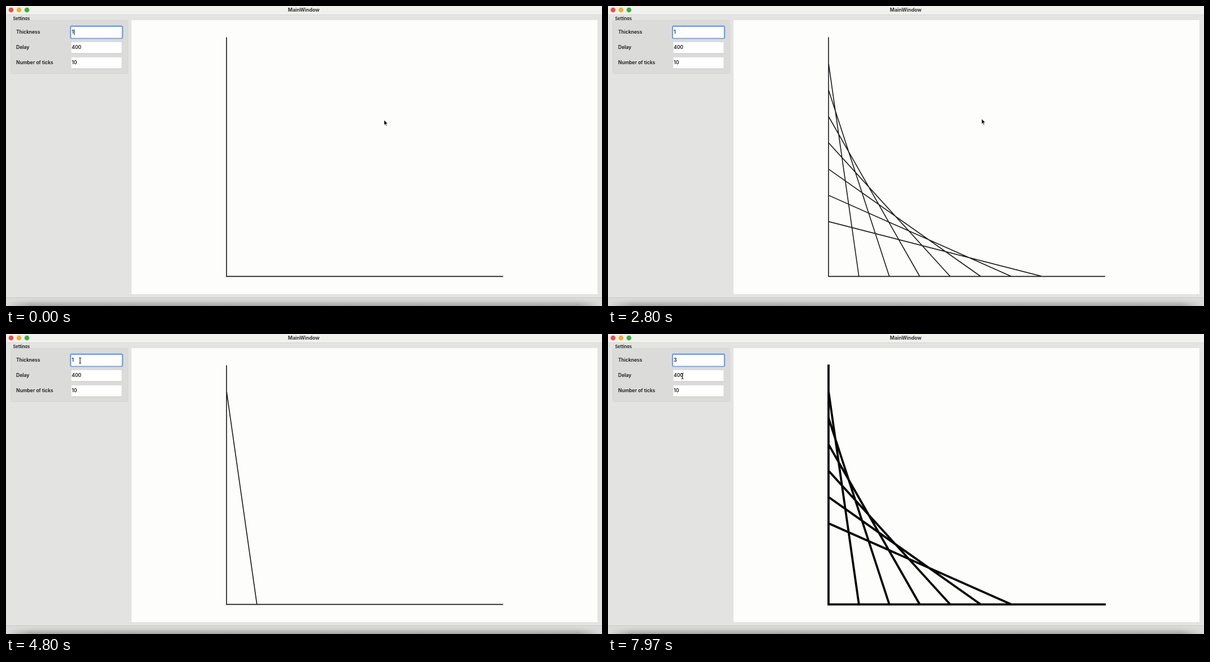
Write an HTML page that moves like this. It is 1054x531 px and loops after 8000 ms.

```html
<!DOCTYPE html>
<html lang="en">
<head>
<meta charset="utf-8">
<title>MainWindow</title>
<style>
  html, body { margin: 0; width: 100%; height: 100%; overflow: hidden; background: #e3e3e2; }
  svg { display: block; width: 1054px; height: 531px; }
  text { font: 600 8.5px Inter, "Open Sans", sans-serif; fill: #161616; }
  .title { font-size: 8.8px; font-weight: 700; fill: #333; }
  .group { font-size: 7.4px; }
  #chart { stroke-linecap: square; fill: none; }
</style>
</head>
<body>
<svg viewBox="0 0 1054 531">
  <defs>
    <linearGradient id="bar" x2="0" y2="1">
      <stop offset="0" stop-color="#dededd"/>
      <stop offset=".4" stop-color="#cfcfce"/>
      <stop offset="1" stop-color="#a3a3a2"/>
    </linearGradient>
    <linearGradient id="barEnds">
      <stop offset="0" stop-color="#dcdcdb"/>
      <stop offset=".04" stop-color="#dcdcdb" stop-opacity="0"/>
      <stop offset=".96" stop-color="#dcdcdb" stop-opacity="0"/>
      <stop offset="1" stop-color="#dcdcdb"/>
    </linearGradient>
  </defs>

  <rect width="1054" height="531" fill="#e3e3e2"/>
  <rect width="1054" height="15" fill="#f0f0ed"/>
  <rect y="15" width="1054" height="1" fill="#d6d6d5"/>
  <circle cx="9" cy="7" r="4.3" fill="#eb4f42"/>
  <circle cx="23" cy="7" r="4.3" fill="#efae2e"/>
  <circle cx="37" cy="7" r="4.3" fill="#3bb03b"/>
  <text class="title" x="526.5" y="10" text-anchor="middle">MainWindow</text>

  <text class="group" x="12.5" y="24.6">Settings</text>
  <rect x="8.5" y="25.5" width="207" height="94" rx="2" fill="#dbdbda" stroke="#d4d4d3"/>
  <g id="form"></g>
  <rect id="caret" y="41.5" width="1" height="10" fill="#111"/>

  <rect x="222" y="25" width="824" height="485" fill="#fdfdfc"/>
  <path id="chart"/>

  <rect y="516" width="1054" height="1" fill="#c6c6c5"/>
  <rect y="517" width="1054" height="14" fill="url(#bar)"/>
  <rect y="517" width="1054" height="14" fill="url(#barEnds)"/>

  <path id="arrow" d="M0 0V9.6L2.2 7.6L3.7 11L5.3 10.3L3.8 7H6.8Z" fill="#0c0c0c" stroke="#fff" stroke-width=".8"/>
  <path id="beam" d="M-2-5Q0-5 0-3.8Q0-5 2-5M0-4V4M-2 5Q0 5 0 3.8Q0 5 2 5" fill="none" stroke="#1a1a1a" stroke-width="1.1"/>
</svg>
<script>
const LOOP = 8000, DELAY = 400, FIRST_TICK = 310;
const TICKS = 9, CYCLE = 11;
const RESTART = FIRST_TICK + 14 * DELAY;
const CLEARED = 5150, TYPED = 5400;
const $ = id => document.getElementById(id);

// Pointer keys: time, x, y
const sweep = [
  [2700, 668.5, 201.5], [2800, 661, 199.5], [3050, 590, 180], [3350, 420, 135],
  [3650, 255, 94], [3900, 165, 70], [4130, 129.5, 62.5], [4400, 131, 47]
];
const drop = [[7450, 132, 47], [7600, 132, 54], [7800, 131.5, 70], [7900, 131.5, 74.5]];

const fields = [["Thickness", "", 37], ["Delay", "400", 64], ["Number of ticks", "10", 91]];
$("form").innerHTML = fields.map(([label, value, y], i) => `
  <text x="18" y="${y + 12.3}">${label}</text>
  ${i ? `<rect x="115.5" y="${y}" width="89" height="20.5" fill="#c3c3c2"/>`
      : `<rect x="114.3" y="35.8" width="91.6" height="21.2" rx="1.5" fill="#fff" stroke="#70a0e6" stroke-width="2.6"/>`}
  <rect x="115.5" y="${y}" width="89" height="19.5" fill="#fff"/>
  <text x="116.3" y="${y + 12.3}">${value}</text>`).join("");
const thickness = $("form").querySelectorAll("text")[1];

function along(keys, t) {
  if (t <= keys[0][0]) return keys[0].slice(1);
  for (let i = 1; i < keys.length; i++) {
    const [t0, x0, y0] = keys[i - 1], [t1, x1, y1] = keys[i];
    if (t < t1) {
      const k = (t - t0) / (t1 - t0);
      return [x0 + (x1 - x0) * k, y0 + (y1 - y0) * k];
    }
  }
  return keys[keys.length - 1].slice(1);
}

function lineCount(t) {
  const start = t < RESTART ? FIRST_TICK : RESTART;
  const n = Math.floor((t - start) / DELAY) + 1;
  const step = (n + CYCLE) % CYCLE;
  return step > TICKS ? 0 : step;
}

function chartPath(count) {
  let d = "M390 56V478.6H878.4";
  for (let k = 1; k <= count; k++) {
    d += `M390.3 ${56.8 + 46.4 * k}L${390 + 53.65 * k} 478`;
  }
  return d;
}

function place(node, [x, y], shown) {
  node.setAttribute("transform", `translate(${x} ${y})`);
  node.style.display = shown ? "" : "none";
}

function draw(t) {
  const thick = t >= RESTART;
  $("chart").setAttribute("d", chartPath(lineCount(t)));
  $("chart").setAttribute("stroke", thick ? "#050505" : "#1a1a1a");
  $("chart").setAttribute("stroke-width", thick ? 3.8 : 1.6);

  const value = t < CLEARED ? "1" : t < TYPED ? "" : "3";
  thickness.textContent = value;
  const blink = t < CLEARED ? t + 150 : t < TYPED ? t - CLEARED : t - TYPED;
  $("caret").setAttribute("x", { "1": 120.5, "": 116.5, "3": 122 }[value]);
  $("caret").style.display = blink % 1000 < 500 ? "" : "none";

  const late = t >= drop[0][0];
  const pos = along(late ? drop : sweep, t);
  const overField = late || t > 4230;
  const hidden = t >= CLEARED && !late;
  place($("arrow"), pos, !overField);
  place($("beam"), pos, overField && !hidden);
}

function frame() {
  draw(performance.now() % LOOP);
  requestAnimationFrame(frame);
}
frame();
</script>
</body>
</html>
```
